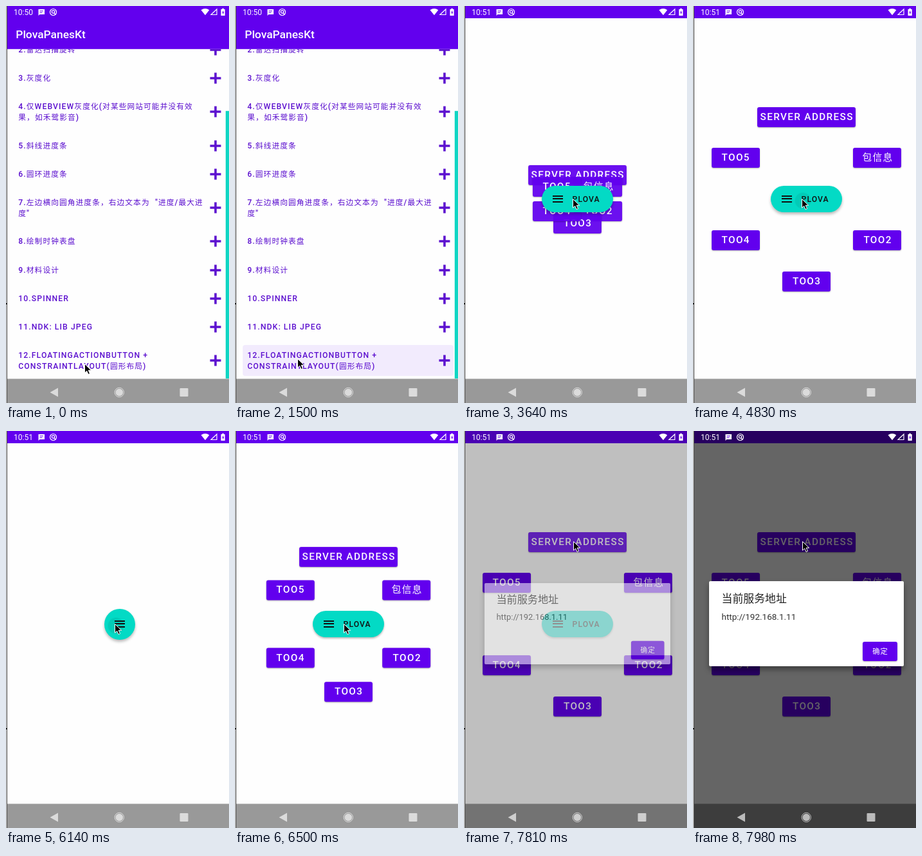
These frames come from a looping animation (347x616 px, 8 s). An HTML page:

```html
<!DOCTYPE html>
<html lang="zh-CN">
<head>
<meta charset="utf-8">
<title>Circular layout demo</title>
<style>
html, body { margin: 0; width: 100%; height: 100%; overflow: hidden; background: #fefefe; }
body { position: relative; font-family: Roboto, "Noto Sans CJK SC", "Noto Sans CJK", sans-serif; font-weight: 500; }
div, svg { position: absolute; box-sizing: border-box; }
b { font-weight: 400; }
.t { white-space: pre; line-height: 20px; height: 20px; }
.layer { left: 0; top: 0; width: 347px; height: 616px; overflow: hidden; }
.caps { letter-spacing: .0893em; }
.caps b { font-size: .96em; }
.btn { background: #6200ee; color: #fff; border-radius: 3px; text-align: center; text-indent: .0893em;
  white-space: nowrap; box-shadow: 0 1px 2px rgba(0,0,0,.3); overflow: hidden; }
.ripple { width: 40px; height: 40px; border-radius: 50%; opacity: 0; }
#edge { left: 0; top: 0; width: 2px; height: 616px; background: linear-gradient(90deg, #d8d8d8 50%, #4c4c4c 50%); }
#edge div { left: 0; top: 461px; width: 2px; height: 2px; background: #111; }
#status { left: 2px; top: 0; width: 345px; height: 19px; background: #6200ee; }
#bar { left: 2px; top: 19px; width: 345px; height: 48px; background: #6200ee; border-bottom: 1px solid #7c2eee; }
#nav { left: 2px; top: 578px; width: 345px; height: 38px; background: #999; border-top: 1px solid #c8c8c8; }
#scroll { left: 342px; top: 163px; width: 5px; height: 416px; background: #0fd6c3; box-shadow: 0 0 1px #0fd6c3; }
#hit { left: 12px; top: 526px; width: 328px; height: 48px; border-radius: 4px; background: #f2ebfd; opacity: 0; }
#round .bg { left: 2px; top: 19px; width: 345px; height: 560px; background: #fefefe; }
#fab { border-radius: 25px; background: #03dac5; overflow: hidden; }
#fab .ripple { left: calc(50% - 26px); top: calc(50% - 18px); background: #000; }
#fab .t { left: 48px; top: calc(50% - 10px); font-size: 12.2px; color: #111; }
#menu { width: 16px; height: 11px; top: calc(50% - 5.5px);
  background: linear-gradient(#111 2px, transparent 2px 4.5px, #111 4.5px 6.5px, transparent 6.5px 9px, #111 9px); }
#dim { left: 2px; top: 0; width: 345px; height: 616px; background: #000; opacity: 0; }
#dialog { left: 25px; top: 233px; width: 303px; height: 132px; background: #fff; border-radius: 2px; opacity: 0;
  box-shadow: 0 5px 9px rgba(0,0,0,.4); color: #222; }
#cursor { left: 0; top: 0; overflow: visible; }
</style>
</head>
<body>
<div id="list" class="layer"></div>
<div id="round" class="layer"><div class="bg"></div></div>
<div id="status"></div>
<div id="nav"></div>
<div id="dim"></div>
<div id="dialog"></div>
<div id="icons" class="layer">
  <svg width="347" height="616" fill="#fff">
    <path d="M50.5 5h9.5v8h-7.5l-2 2z"/>
    <path d="M52.5 7.7h5.5M52.5 10.2h4" stroke="#6200ee" stroke-width="1.1"/>
    <g fill="none" stroke="#fff" stroke-width="1.2">
      <circle cx="73.5" cy="9.5" r="5"/><circle cx="73.5" cy="9" r="2.2"/><path d="M74.5 10.5l3 3"/>
      <path d="M319 13.5L328 5v8.5z"/>
    </g>
    <path d="M303.5 6.3Q310 1.8 316.3 6.3L310 14.2z"/>
    <path d="M334.5 5h1.8V3.8h2.6V5h1.8v10h-6.2z"/>
    <path d="M338.2 6.8l-2 3.7h1.2v2.8l2-3.7h-1.2z" fill="#6200ee"/>
    <g fill="rgba(255,255,255,.65)">
      <path d="M68.5 599.5L81 592.5v14z"/>
      <circle cx="176.3" cy="599.5" r="5.8"/>
      <circle cx="176.3" cy="599.5" r="7.2" fill="none" stroke="rgba(255,255,255,.65)" stroke-width="1"/>
      <rect x="270.5" y="593" width="13" height="13" rx="1"/>
    </g>
  </svg>
</div>
<div id="edge"><div></div></div>
<svg id="cursor" width="14" height="20">
  <path d="M.5 .5V14.2l3.2-3 2.3 5.3 2.5-1.1-2.3-5.1h4.5z" fill="#000" stroke="#fff" stroke-width="1"/>
</svg>
<script>
const LOOP = 8000;
const $ = id => document.getElementById(id);

function add(parent, cls, css = {}, html = '') {
  const el = document.createElement('div');
  el.className = cls;
  Object.assign(el.style, css);
  el.innerHTML = html;
  parent.append(el);
  return el;
}

const px = n => n + 'px';
const regularCjk = s => s.replace(/[\u3000-\u9fff\uff00-\uffef]+/g, '<b>$&</b>');

// Left-aligned line of text, centred on y.
function text(parent, s, x, y, size, color, cls = '') {
  return add(parent, 't ' + cls, { left: px(x), top: px(y - 10), fontSize: px(size), color }, regularCjk(s));
}

// Steps are [ms, properties, easing to the next step].
function play(el, steps) {
  const frames = steps.map(([ms, props, easing = 'linear']) => ({ offset: ms / LOOP, easing, ...props }));
  if (frames[0].offset > 0) frames.unshift({ ...frames[0], offset: 0, easing: 'linear' });
  const last = frames[frames.length - 1];
  if (last.offset < 1) frames.push({ ...last, offset: 1 });
  el.animate(frames, { duration: LOOP, iterations: Infinity });
}

const fade = (el, steps) => play(el, steps.map(([ms, opacity]) => [ms, { opacity }]));

// List page
const list = $('list');
const PURPLE = '#5c10cf';
const hit = add(list, '');
hit.id = 'hit';
const rows = [
  [68, '2.雷达扫描旋转'],
  [112, '3.灰度化'],
  [164, '4.仅WEBVIEW灰度化(对某些网站可能并没有效', '果，如禾鹭影音)'],
  [216.5, '5.斜线进度条'],
  [260.5, '6.圆环进度条'],
  [313, '7.左边横向圆角进度条，右边文本为  "进度/最大进', '度"'],
  [365, '8.绘制时钟表盘'],
  [409.5, '9.材料设计'],
  [453.5, '10.SPINNER'],
  [497.5, '11.NDK: LIB JPEG'],
  [550, '12.FLOATINGACTIONBUTTON +', 'CONSTRAINTLAYOUT(圆形布局)']
];
const plus = `<svg width="18" height="18"><path d="M.5 9h17M9 .5v17" stroke="${PURPLE}" stroke-width="3.6"/></svg>`;
for (const [y, ...lines] of rows) {
  lines.forEach((s, i) => text(list, s, 19.3, y + (i - (lines.length - 1) / 2) * 17, 12.2, PURPLE, 'caps'));
  add(list, '', { left: '316.5px', top: px(Math.round(y - .6) - 8.5) }, plus);
}
add(list, '').id = 'scroll';
add(list, '').id = 'bar';
text(list, 'PlovaPanesKt', 15.3, 43.5, 17.4, '#fff');

play(hit, [
  [1210, { opacity: 0, clipPath: 'circle(10px at 85px 23px)' }],
  [1210, { opacity: .7, clipPath: 'circle(20px at 85px 23px)' }, 'ease-out'],
  [1450, { opacity: 1, clipPath: 'circle(260px at 85px 23px)' }],
  [1570, { opacity: 1, clipPath: 'circle(260px at 85px 23px)' }],
  [1850, { opacity: 0, clipPath: 'circle(260px at 85px 23px)' }]
]);

// Circular page
const round = $('round');
const CX = 176.5, CY = 299.5, RADIUS = 127.5;
const labels = ['SERVER ADDRESS', '包信息', 'TOO2', 'TOO3', 'TOO4', 'TOO5'];
const OPEN = [3545, 6155], CLOSE = 4860;
const DECEL = 'cubic-bezier(.333,.667,.667,1)';

const buttons = labels.map((label, i) => {
  const a = (i * 60 - 90) * Math.PI / 180;
  const dx = RADIUS * Math.cos(a), dy = RADIUS * Math.sin(a);
  const w = i ? 75 : 153;
  const el = add(round, 'btn caps', {
    left: px(CX + dx - w / 2), top: px(CY + dy - 15.5),
    width: px(w), height: '31px', lineHeight: '31px', fontSize: '15.3px'
  }, regularCjk(label));
  const inside = { transform: `translate(${-dx}px, ${-dy}px)` };
  const outside = { transform: 'translate(0px, 0px)' };
  play(el, [
    [OPEN[0], inside, DECEL], [OPEN[0] + 600, outside],
    [CLOSE, outside, 'ease-in-out'], [5180, inside],
    [OPEN[1], inside, DECEL], [OPEN[1] + 600, outside]
  ]);
  fade(el, [
    [OPEN[0], 0], [OPEN[0] + 95, .94], [OPEN[0] + 200, 1],
    [CLOSE + 170, 1], [5180, 0],
    [OPEN[1], 0], [OPEN[1] + 95, .94], [OPEN[1] + 200, 1]
  ]);
  return el;
});

const fab = add(round, '');
fab.id = 'fab';
const fabRipple = add(fab, 'ripple');
const menu = add(fab, '');
menu.id = 'menu';
const fabText = add(fab, 't caps', {}, 'PLOVA');

const box = (w, h) => ({ left: px(CX - w / 2), top: px(CY - h / 2), width: px(w), height: px(h) });
const shadow = n => ({ boxShadow: `0 ${n}px ${n + 1}px rgba(0,0,0,.27)` });
const morph = (small, big) => [
  [OPEN[0], small], [OPEN[0] + 90, big],
  [CLOSE, big], [CLOSE + 200, small],
  [OPEN[1], small], [OPEN[1] + 90, big]
];
play(fab, morph(box(48, 48), box(111, 41)));
play(menu, morph({ left: '16px' }, { left: '16.5px' }));
play(fabText, morph({ opacity: 0 }, { opacity: 1 }));

const presses = [3530, 4830, 6140];
play(fab, presses.flatMap(t => [[t - 10, shadow(2)], [t, shadow(3)], [t + 200, shadow(3)], [t + 340, shadow(2)]]));
play(fabRipple, presses.flatMap(t => [
  [t, { opacity: 0, transform: 'scale(.5)' }],
  [t, { opacity: .07, transform: 'scale(.6)' }],
  [t + 60, { opacity: .07, transform: 'scale(1.8)' }],
  [t + 110, { opacity: 0, transform: 'scale(2.6)' }]
]));

play(round, [
  [1560, { opacity: 0, transform: 'translateY(46px)' }, 'ease-out'],
  [1700, { opacity: .85, transform: 'translateY(12px)' }, 'ease-out'],
  [1850, { opacity: 1, transform: 'translateY(0px)' }]
]);

const tapRipple = add(buttons[0], 'ripple', { left: '50px', top: '-5px', background: '#fff' });
play(tapRipple, [
  [7580, { opacity: 0, transform: 'scale(.4)' }],
  [7580, { opacity: .24, transform: 'scale(.5)' }],
  [7750, { opacity: .24, transform: 'scale(4.5)' }],
  [7950, { opacity: 0, transform: 'scale(4.5)' }]
]);

// Dialog
const dialog = $('dialog');
text(dialog, '当前服务地址', 19.5, 27, 16.9, '#222');
text(dialog, 'http://192.168.1.11', 19.5, 54.5, 13.5, '#333').style.fontWeight = 400;
add(dialog, 'btn caps', {
  left: '239px', top: '94px', width: '54px', height: '30px', lineHeight: '30px', fontSize: '11.8px'
}, regularCjk('确定'));
fade($('dim'), [[7700, 0], [7970, .6]]);
play(dialog, [
  [7720, { opacity: 0, transform: 'scale(.9)' }, 'ease-out'],
  [7960, { opacity: 1, transform: 'scale(1)' }]
]);

// Clock
const CLOCK_TICK = 2600;
function clock(s, before, after) {
  const el = text($('icons'), s, 12, 9.5, 12, '#fff');
  el.style.fontWeight = 400;
  fade(el, [[CLOCK_TICK, before], [CLOCK_TICK, after]]);
}
clock('10:50', 1, 0);
clock('10:51', 0, 1);

// Pointer
const path = [
  [790, 122, 555], [860, 97, 547],
  [2190, 97, 547], [2400, 140, 488], [2620, 193, 410], [2800, 186, 355], [2950, 169, 322],
  [3000, 169, 322], [3120, 169, 299],
  [6600, 169, 299], [6760, 176, 235], [6920, 176, 185],
  [6970, 176, 185], [7220, 170, 171]
];
play($('cursor'), path.map(([ms, x, y]) => [ms, { transform: `translate(${x}px, ${y}px)` }]));
</script>
</body>
</html>
```
